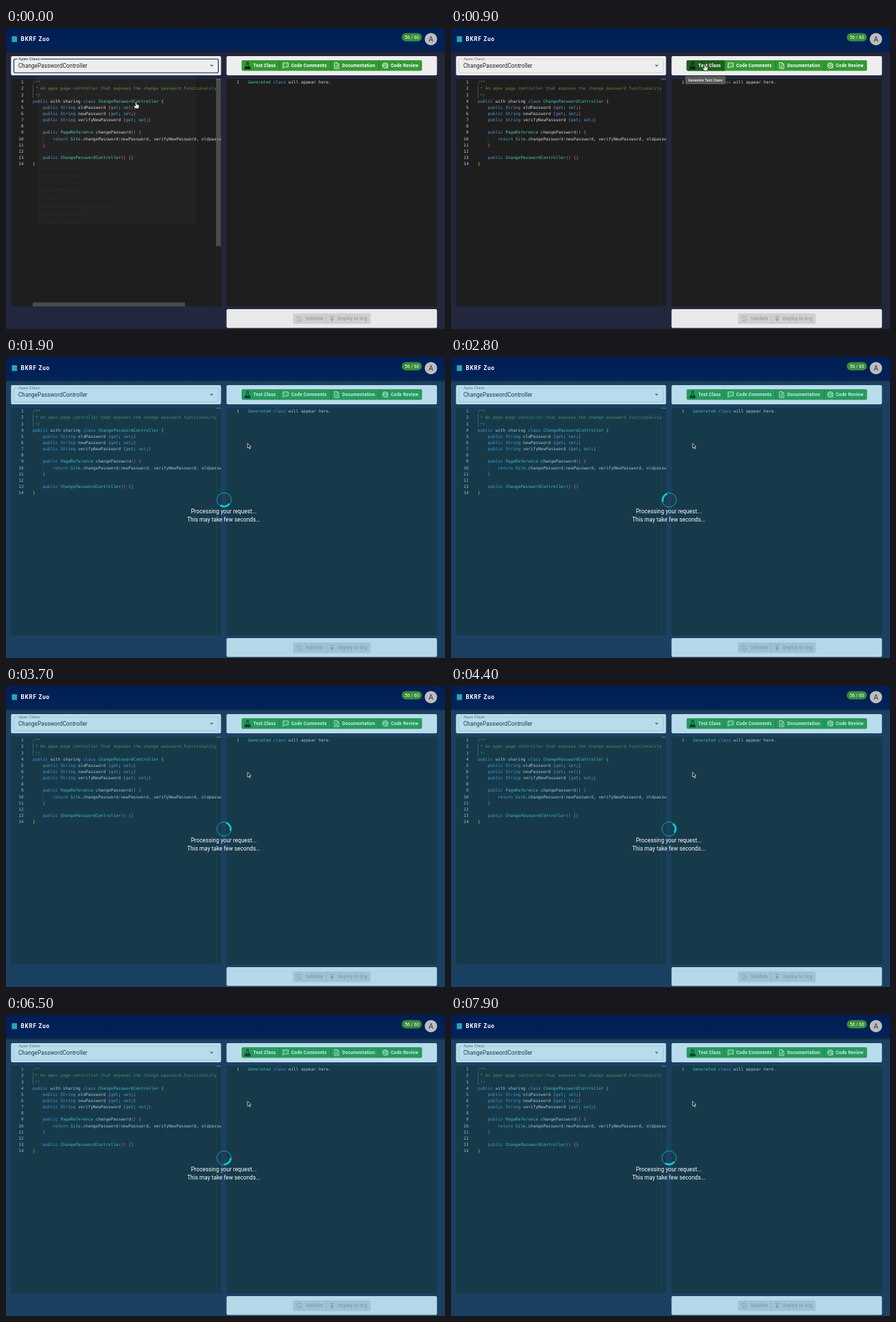
Write an HTML page that moves like this. It is 640 by 439 pixels and loops after 8000 ms.

```html
<!DOCTYPE html>
<html lang="en">
<head>
<meta charset="utf-8">
<title>Class generator</title>
<style>
  html, body { margin: 0; width: 100%; height: 100%; overflow: hidden; background: #23273d; }
  svg { display: block; width: 640px; height: 439px; }
  text { font-family: Roboto, sans-serif; white-space: pre; }
  .code { font-family: "DejaVu Sans Mono", monospace; font-size: 6.1px; fill: #d4d4d4; }
  .num { text-anchor: end; fill: #c6c6c6; }
  .btn { font-size: 6.6px; font-weight: 600; letter-spacing: .19px; }
  .body { font-size: 8.14px; letter-spacing: .076px; }
  .mid { text-anchor: middle; }
</style>
</head>
<body>
<svg id="stage" viewBox="0 0 640 439" xmlns="http://www.w3.org/2000/svg"></svg>
<script>
const LOOP = 8000, STEP = 100;
const SPIN = 2000 / 3;
const CLICK = 900, BUSY = 1000;
const LINE = 9.15;

const source = [
  '/**',
  ' * An apex page controller that exposes the change password functionality',
  ' */',
  'public with sharing class ChangePasswordController {',
  '    public String oldPassword {get; set;}',
  '    public String newPassword {get; set;}',
  '    public String verifyNewPassword {get; set;}',
  '',
  '    public PageReference changePassword() {',
  '        return Site.changePassword(newPassword, verifyNewPassword, oldpassword);',
  '    }',
  '',
  '    public ChangePasswordController() {}',
  '}'
];

const keyword = /^(public|class|String|get|set|return)$/;
const brackets = ['#ffd700', '#da70d6', '#179fff'];
let depth = 0;

function tokenColor(tok) {
  if (/[{(]/.test(tok)) return brackets[depth++ % 3];
  if (/[})]/.test(tok)) return brackets[--depth % 3];
  if (keyword.test(tok)) return '#569cd6';
  return /^[A-Z]/.test(tok) ? '#4ec9b0' : '#d4d4d4';
}

function highlight(line) {
  if (/^\/| \*/.test(line)) return `<tspan fill="#608b4e">${line}</tspan>`;
  return (line.match(/\s+|\w+|[{}()]|[^\w\s{}()]+/g) || [])
    .map(tok => `<tspan fill="${tokenColor(tok)}">${tok}</tspan>`).join('');
}

const rect = (x, y, w, h, fill, extra = '') =>
  `<rect x="${x}" y="${y}" width="${w}" height="${h}" fill="${fill}" ${extra}/>`;
const text = (x, y, cls, fill, str, extra = '') =>
  `<text x="${x}" y="${y}" class="${cls}" ${fill ? `fill="${fill}"` : ''} ${extra}>${str}</text>`;
const path = (d, extra) => `<path d="${d}" ${extra}/>`;
const group = (id, body, extra = '') => `<g id="${id}" ${extra}>${body}</g>`;
const line = (w, color = '#fff') => `fill="none" stroke="${color}" stroke-width="${w}" stroke-linejoin="round"`;

const listing = source.map((str, i) => {
  const y = 81.2 + i * LINE;
  return text(25.6, y, 'code num', '', i + 1) + text(39, y, 'code', '', highlight(str));
}).join('');

const menuRows = ['AccountHelper', 'AccountService', 'CaseQueueRouter', 'ContactList',
  'ChangePasswordController', 'ForgotController', 'LoginController'];
const ghostMenu = rect(45.5, 69, 230.5, 218, '#fff', 'opacity=".022"') +
  menuRows.map((s, i) => text(50, 212 + i * 11.1, 'body', '#000', s, 'opacity=".16"')).join('');

const selectField = (border, width, label) =>
  rect(11.5, 45.3, 298, 20, 'none', `rx="2" stroke="${border}" stroke-width="${width}"`) +
  rect(16.5, 44.2, 34, 2.4, '#eee') +
  text(18.3, 47.1, '', label, 'Apex Class', 'font-size="6.1" letter-spacing=".06"');

const flask = path('M350.3 50.2h3.6M351 50.4v3.4l-3.2 5q-.5 1.1.6 1.1h7.4q1.1 0 .6-1.1l-3.2-5v-3.4', line(.9, '#0b1a0d')) +
  path('M349.8 56.2h4.8l1.8 3.1h-8.4z', 'fill="#0b1a0d"');
const bubble = path('M404 51h7.4v5.8h-5.6l-1.8 1.8z', line(.9)) +
  path('M406.6 52.7l-1.2 1.2 1.2 1.2M408.9 52.7l1.2 1.2-1.2 1.2', line(.6));
const page = path('M479 50.6h3.8l2.4 2.4v6.2h-6.2zM480.5 55h3.2M480.5 57h3.2M482.8 50.6v2.4h2.4', line(.8));
const review = `<circle cx="553" cy="54.7" r="3.9" ${line(1)}/><circle cx="553" cy="54.4" r="1.6" ${line(.8)}/>` +
  path('M554.2 55.6l2.8 3M549.4 54.5h2M554.6 53.5h2', line(.9));

const actions = rect(343.5, 47, 263, 15.4, '#339a33', 'rx="2"') +
  group('hover', path('M345.5 47H399v15.4h-53.5q-2 0-2-2v-11.4q0-2 2-2z', 'fill="#1b5e20"')) +
  [399, 473.5, 544].map(x => rect(x - .3, 47, .6, 15.4, '#1b6a22')).join('') +
  flask + bubble + page + review +
  [[360.5, 'Test Class'], [415.8, 'Code Comments'], [490.3, 'Documentation'], [561, 'Code Review']]
    .map(([x, s]) => text(x, 57.1, 'btn', '#fff', s)).join('');

const gray = '#a3a3a3';
const footer = rect(321.5, 410, 306.8, 27.6, '#e9e9e9', 'rx="2"') +
  rect(418.5, 416.2, 113, 15.6, '#cfcfcf', 'rx="2"') +
  rect(466.7, 416.2, .6, 15.6, '#b4b4b4') +
  `<circle cx="427.3" cy="424" r="3.7" ${line(1, gray)} stroke-dasharray="9 2.6"/>` +
  path('M425.4 424l1.4 1.4 2.6-2.8', line(.9, gray)) +
  path('M472.2 420.3h6.4v1h-6.4zM475.4 422l3.2 3.2h-2v2.6h-2.4v-2.6h-2z', `fill="${gray}"`) +
  text(436.8, 426.4, 'btn', gray, 'Validate') +
  text(484, 426.4, 'btn', gray, 'Deploy to Org');

const header = rect(0, 33.4, 640, 3.5, 'url(#shade)') + rect(0, 0, 640, 33.4, 'url(#bar)') +
  rect(8.5, 12, 7.5, 8.5, '#2aa5b5') +
  text(21.5, 19.2, '', '#fff', 'BKRF Zuo', 'font-size="8.14" font-weight="700" letter-spacing=".814"') +
  rect(577, 7.6, 29.2, 12, '#388e3c', 'rx="6"') +
  text(591.7, 15.9, 'mid', '#fff', '56 / 60', 'font-size="6.6"') +
  '<circle cx="619.5" cy="16.2" r="9" fill="#bdbdbd"/>' +
  text(619.5, 19.8, 'mid', '#25304d', 'A', 'font-size="10.2"');

const loader = rect(0, 33.4, 640, 405.6, '#039be5', 'opacity=".225"') +
  `<circle cx="318" cy="208.5" r="10.4" ${line(.9, '#0bb3bf')}/>` +
  path('M318 199.1A9.4 9.4 0 0 1 327.4 208.5', `id="arc" ${line(2.6, '#06cdd4')}`) +
  text(317.5, 228.1, 'body mid', '#fff', 'Processing your request...') +
  text(317.5, 240.3, 'body mid', '#fff', 'This may take few seconds...');

const hand = path('M-.9 .6Q0-.5.9.6V3.4L3.5 4q1.2.3 1.1 1.5L4 8.2 3.4 9.5H-.8L-3.2 6.2Q-3.4 5-2.2 5.2L-.9 6.2z',
  'fill="#fff" stroke="#111" stroke-width=".65" stroke-linejoin="round"') +
  path('M1 4.8v1.6M2.4 5v1.4', line(.4, '#111'));
const arrow = path('M0 0V7L1.7 5.5 2.9 8.3 4.1 7.8 2.9 5.1H5.1z',
  'fill="#111" stroke="#fff" stroke-width=".7" stroke-linejoin="round"');

document.getElementById('stage').innerHTML = `
  <defs>
    <linearGradient id="bar" x2="0" y2="1"><stop stop-color="#001e54"/><stop offset="1" stop-color="#012358"/></linearGradient>
    <linearGradient id="shade" x2="0" y2="1"><stop stop-color="#0b0f22" stop-opacity=".6"/><stop offset="1" stop-color="#0b0f22" stop-opacity="0"/></linearGradient>
    <clipPath id="pane"><rect x="7.3" y="74.2" width="306.2" height="331.8"/></clipPath>
  </defs>` +
  rect(0, 0, 640, 439, '#23273d') +
  rect(7.3, 41, 306.2, 28, '#eee', 'rx="2"') +
  group('focused', selectField('#0b2357', 1.1, '#0b2357')) +
  group('blurred', selectField('#c2c2c2', .6, '#666')) +
  text(18, 58, 'body', '#222', 'ChangePasswordController') +
  path('M297.1 53.7h5.4l-2.7 2.8z', 'fill="#666"') +
  rect(321.5, 41, 306.8, 28, '#eee', 'rx="2"') + actions +
  rect(7.3, 74.2, 306.2, 331.8, '#1e1e1e') +
  rect(321.5, 74.2, 306.8, 331.8, '#1e1e1e') +
  `<g clip-path="url(#pane)">` +
  rect(306, 74.2, .5, 331.8, '#303030') +
  rect(39.1, 83.5, .6, 18.3, '#707070') + rect(53.8, 156.6, .5, 9.2, '#454545') +
  listing + rect(306.5, 74.2, 7, 1, '#8f8f8f') +
  group('bars', rect(306.3, 74.2, 7.2, 244, '#797979', 'opacity=".5"') + rect(38.8, 400.2, 222.2, 5.8, '#797979', 'opacity=".5"')) +
  '</g>' +
  text(340, 81.2, 'code num', '', 1) +
  text(353, 81.2, 'code', '', highlight('Generated class will appear here.')) +
  footer + group('menu', ghostMenu) + group('loader', loader) + header +
  group('tip', rect(341.3, 70, 59, 12, '#5c5c5c', 'rx="2"') +
    text(370.8, 78, 'mid', '#fff', 'Generate Test Class', 'font-size="5.6" font-weight="500"')) +
  group('cursor', group('hand', hand) + group('arrow', arrow));

const el = id => document.getElementById(id);
const show = (id, alpha) => el(id).setAttribute('opacity', Number(alpha));
const ease = u => u * u * (3 - 2 * u);
const ramp = (t, a, b) => ease(Math.min(1, Math.max(0, (t - a) / (b - a))));
const mix = (a, b, u) => a + (b - a) * u;

function cursorAt(t) {
  const u = ramp(t, 0, 700), v = ramp(t, 1000, 1700);
  return [mix(mix(189.6, 370, u), 352.2, v), mix(mix(108, 52.8, u), 125.8, v)];
}

function draw(t) {
  const early = t < CLICK;
  show('focused', early);
  show('blurred', !early);
  show('bars', early);
  show('menu', early);
  show('loader', t >= BUSY);

  const [x, y] = cursorAt(t);
  const onButton = x > 343.5 && y < 62.4 && t <= BUSY;
  const pointing = t < 100 || onButton;
  show('hover', onButton ? (t < BUSY ? 1 : .35) : 0);
  show('tip', t < CLICK || t > BUSY ? 0 : t < BUSY ? .95 : .35);
  show('hand', pointing);
  show('arrow', !pointing);
  el('cursor').setAttribute('transform', `translate(${x} ${y})`);
  el('arc').setAttribute('transform', `rotate(${(t - BUSY) / SPIN * 360} 318 208.5)`);
}

const start = performance.now();
function tick() {
  const t = (performance.now() - start) % LOOP;
  draw(Math.floor(t / STEP) * STEP);
  requestAnimationFrame(tick);
}
tick();
</script>
</body>
</html>
```
